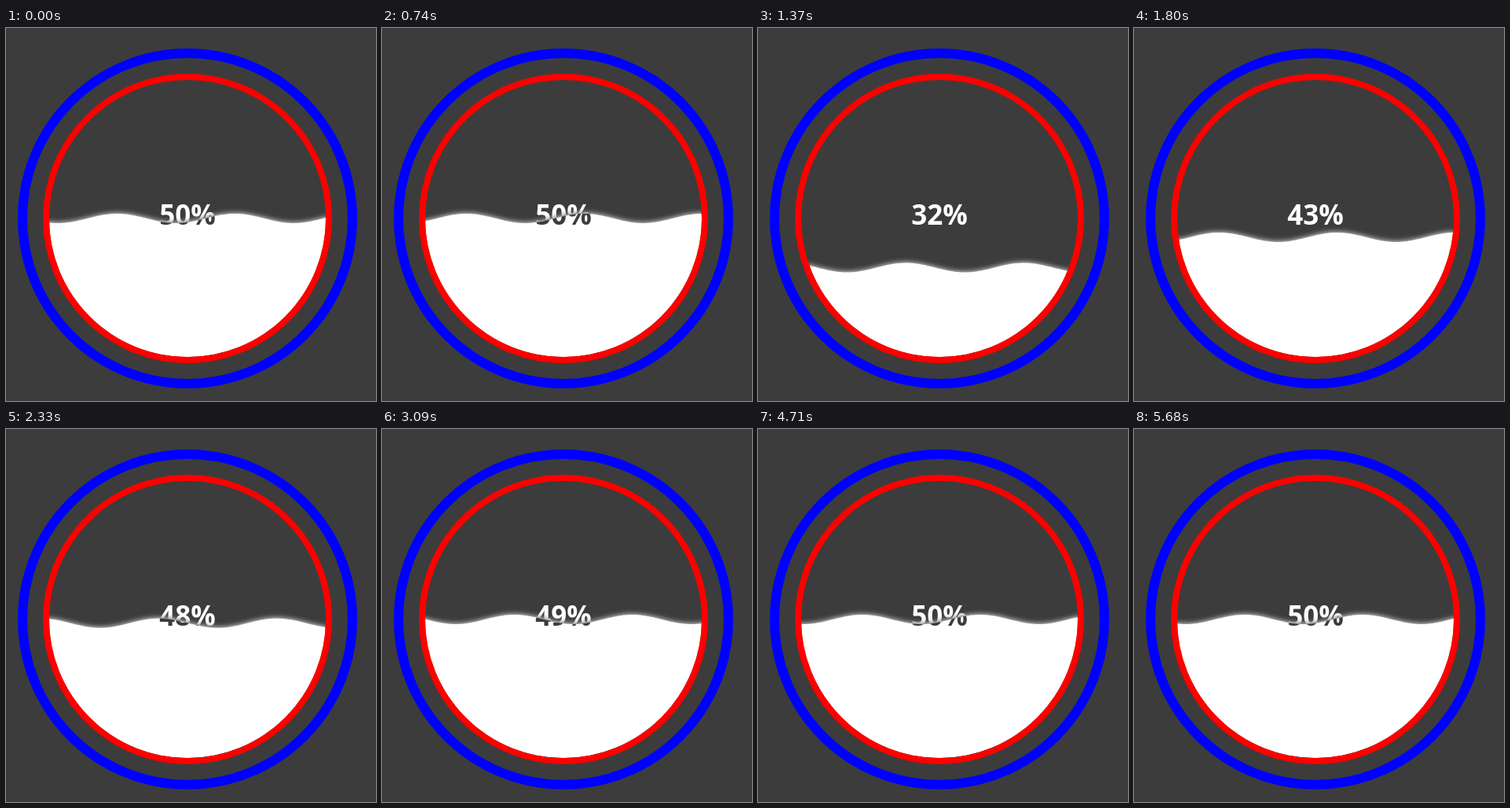
Recreate the animation shown at these times as an HTML page with a canvas. Size 471 by 474 pixels, loop 5.78 s.

```html
<!DOCTYPE html>
<html>
<head>
<meta charset="utf-8">
<style>
html, body { margin: 0; width: 100%; height: 100%; overflow: hidden; background: #3c3c3c; }
canvas { display: block; }
</style>
</head>
<body>
<canvas id="stage" width="471" height="474"></canvas>
<script>
const W = 471, H = 474, LOOP = 5780;
const CX = 231, CY = 242, R = 176;
const AMP = 6, WAVE = 150;
const RESET = 770, RISE_START = 775, RISE = 2615, TARGET = 50;

const ctx = document.getElementById('stage').getContext('2d');
const layer = document.createElement('canvas');
layer.width = W;
layer.height = H;
const liquid = layer.getContext('2d');

// The gauge empties at RESET and fills up again with a quartic ease-out.
function levelAt(t) {
  if (t < RESET) return TARGET;
  const u = Math.min(1, Math.max(0, (t - RISE_START) / RISE));
  return TARGET * (1 - Math.pow(1 - u, 4));
}

// x of a wave crest
function crestAt(t) {
  if (t < RESET) return 141 + 0.1568 * t;
  return 188 + 0.1631 * (Math.min(t, 5680) - 1370);
}

function ring(radius, width, color) {
  ctx.beginPath();
  ctx.arc(CX, CY, radius, 0, Math.PI * 2);
  ctx.lineWidth = width;
  ctx.strokeStyle = color;
  ctx.stroke();
}

function drawLiquid(level, crest) {
  const surface = CY + R - level / 100 * R * 2;
  liquid.clearRect(0, 0, W, H);
  liquid.save();
  liquid.beginPath();
  liquid.arc(CX, CY, R, 0, Math.PI * 2);
  liquid.clip();
  if (level > 0) {
    liquid.beginPath();
    liquid.moveTo(-20, H + 40);
    for (let x = -20; x <= W + 20; x += 2) {
      liquid.lineTo(x, surface - AMP * Math.cos((x - crest) / WAVE * Math.PI * 2));
    }
    liquid.lineTo(W + 20, H + 40);
    liquid.closePath();
    liquid.fillStyle = '#fff';
    liquid.shadowColor = '#fff';
    liquid.shadowBlur = 7;
    liquid.fill();
  }
  liquid.restore();
}

function drawLabel(level) {
  liquid.save();
  liquid.globalCompositeOperation = 'xor';
  liquid.font = 'bold 35px "Open Sans", "Noto Sans", sans-serif';
  liquid.textAlign = 'center';
  liquid.fillStyle = '#fff';
  liquid.fillText(Math.floor(level) + '%', CX, 250);
  liquid.restore();
}

function draw(t) {
  const level = levelAt(t);
  ctx.fillStyle = '#3c3c3c';
  ctx.fillRect(0, 0, W, H);
  drawLiquid(level, crestAt(t));
  drawLabel(level);
  ctx.drawImage(layer, 0, 0);
  ring(210, 12, '#00f');
  ring(180, 8, '#f00');
}

const start = performance.now();
function tick(now) {
  draw(Math.max(0, now - start) % LOOP);
  requestAnimationFrame(tick);
}
draw(0);
requestAnimationFrame(tick);
</script>
</body>
</html>
```
